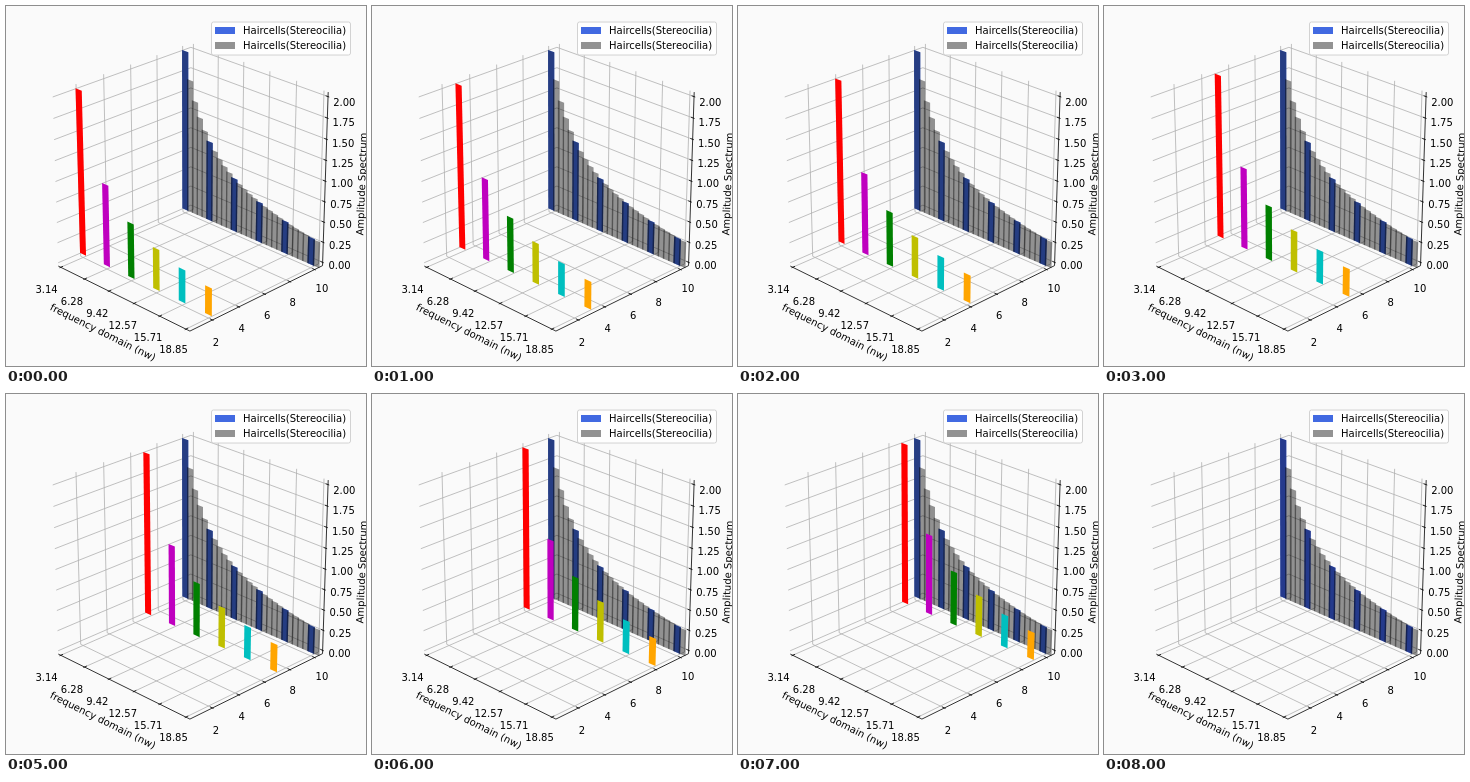
Write an HTML page that moves like this. It is 360x360 px and loops after 9 s.

```html
<!DOCTYPE html>
<html lang="en">
<head>
<meta charset="utf-8">
<title>Amplitude spectrum</title>
<style>
  html, body { margin: 0; width: 100%; height: 100%; overflow: hidden; background: #fafafa; }
  svg { display: block; width: 360px; height: 360px; }
  text { font: 10px "DejaVu Sans", sans-serif; fill: #000; }
  .mid { text-anchor: middle; }
  .grid { fill: none; stroke: #b0b0b0; stroke-width: .8; }
  .axis { fill: none; stroke: #000; stroke-width: .8; }
</style>
</head>
<body>
<svg viewBox="0 0 360 360">
  <g id="plot"></g>
  <g id="wall"></g>
  <g id="moving"></g>
  <g id="labels"></g>
  <rect x="205.5" y="16" width="139" height="33" rx="2" fill="#fefefe" stroke="#d2d2d2"/>
  <rect x="209" y="21" width="20" height="7" fill="#4169e1"/>
  <rect x="209" y="36" width="20" height="7" fill="#929292"/>
  <text x="237" y="28">Haircells(Stereocilia)</text>
  <text x="237" y="43">Haircells(Stereocilia)</text>
</svg>
<script>
const NS = 'http://www.w3.org/2000/svg';
const $ = id => document.getElementById(id);
const plot = $('plot'), wall = $('wall'), moving = $('moving'), labels = $('labels');

// Camera: elevation 25 degrees, azimuth -45 degrees, eye 10 units away
const elev = 25 * Math.PI / 180, sin = Math.sin(elev), cos = Math.cos(elev);
const width = .993;
function project(x, y, z) {
  x = x * width - .5; y -= .5; z -= .5;
  const side = (x + y) * Math.SQRT1_2, away = (y - x) * Math.SQRT1_2;
  const k = 1915 / (10 + away * cos - z * sin);
  return [184.9 + side * k, 175.1 - (away * sin + z * cos) * k];
}

// Data values to the unit box
const tx = x => .0195 + .0606 * (x - Math.PI);
const ty = y => .02 + .097 * (y - .55);
const tz = z => .02 + .4775 * z;

function add(parent, tag, attrs, text) {
  const el = document.createElementNS(NS, tag);
  for (const key in attrs) el.setAttribute(key, attrs[key]);
  if (text) el.textContent = text;
  return parent.appendChild(el);
}
const coords = pts => pts.map(p => project(...p).map(v => v.toFixed(2)).join()).join(' ');
const line = (cls, ...pts) => add(plot, 'polyline', { class: cls, points: coords(pts) });
const label = (x, y, text, angle = 0) => add(labels, 'text',
  { class: 'mid', transform: `translate(${x} ${y}) rotate(${angle})`, y: 3.6 }, text);

const barPoints = (n, y) => {
  const x = n * Math.PI, a = tx(x - .4), b = tx(x + .4), d = ty(y), top = tz(2 / n);
  return coords([[a, d, tz(0)], [b, d, tz(0)], [b, d, top], [a, d, top]]);
};
const bar = (parent, n, y, fill) => add(parent, 'polygon', { points: barPoints(n, y), fill });

const harmonics = [1, 2, 3, 4, 5, 6];
const depths = [2, 4, 6, 8, 10];
const levels = Array.from({ length: 9 }, (_, i) => i / 4);

for (const n of harmonics) {
  const t = tx(n * Math.PI);
  line('grid', [t, 0, 0], [t, 1, 0], [t, 1, 1]);
}
for (const y of depths) line('grid', [1, ty(y), 0], [0, ty(y), 0], [0, ty(y), 1]);
for (const z of levels) line('grid', [0, 0, tz(z)], [0, 1, tz(z)], [1, 1, tz(z)]);

line('axis', [0, 0, 0], [1, 0, 0], [1, 1, 0], [1, 1, 1]);

harmonics.forEach((n, i) => {
  const t = tx(n * Math.PI);
  line('axis', [t, -.0083, 0], [t, .0167, 0]);
  label(40.5 + 25.4 * i, 283.3 + 12.1 * i, (n * Math.PI).toFixed(2));
});
depths.forEach((y, i) => {
  line('axis', [.9833, ty(y), 0], [1.0083, ty(y), 0]);
  label(210 + 25.6 * i + (y > 9 ? 3.5 : 0), 336 - 13.3 * i, String(y));
});
levels.forEach((z, i) => {
  line('axis', [.9833, 1, tz(z)], [1.0083, 1, tz(z)]);
  label(333.5 + .6 * i, 259.4 - 20.4 * i, z.toFixed(2));
});
label(97, 326.2, 'frequency domain (nw)', 26.4);
label(355.5, 178, 'Amplitude Spectrum', -88);

// Fixed row at the back: blue bars seen through translucent dark ones
const blues = harmonics.map(n => bar(wall, n, 10, '#4169e1'));
for (let k = 0; k <= 26; k++) bar(wall, 1 + k / 5, 10, 'rgba(0,0,0,.42)');

// Row that steps towards the back, one unit per second
const colors = ['#f00', '#bf00bf', '#008000', '#bfbf00', '#00bfbf', '#ffa500'];
const bars = harmonics.map((n, i) => bar(moving, n, 2, colors[i]));

const start = performance.now();
let shown = -1;
function tick() {
  const step = Math.floor((performance.now() - start) / 1000) % 9;
  if (step !== shown) {
    shown = step;
    const merged = step === 8;
    bars.forEach((el, i) => el.setAttribute('points', barPoints(harmonics[i], 2 + step)));
    moving.setAttribute('visibility', merged ? 'hidden' : 'visible');
    blues.forEach(el => el.setAttribute('fill', merged ? '#3f64f2' : '#4169e1'));
  }
  requestAnimationFrame(tick);
}
tick();
</script>
</body>
</html>
```
